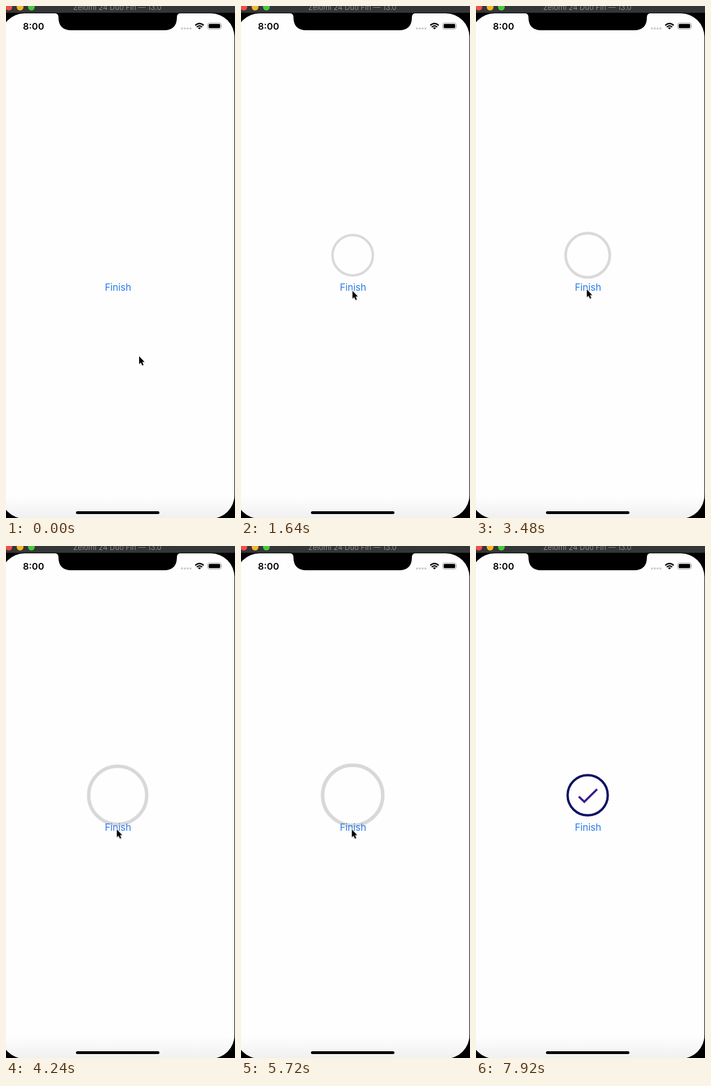
An HTML page that plays this animation: 406x908 px, repeating every 8560 ms.

```html
<!DOCTYPE html>
<html lang="en">
<head>
<meta charset="utf-8">
<title>Finish check</title>
<style>
  :root { --loop: 8560ms linear infinite; }
  html, body { margin: 0; width: 100%; height: 100%; overflow: hidden; background: #000; }
  svg { display: block; width: 406px; height: 908px; }
  text { font-family: Inter, "Open Sans", sans-serif; }

  .ring {
    fill: none; stroke: #d8d8d8; stroke-width: 4.2;
    transform-origin: 198px 442px;
    animation: pulse var(--loop), show var(--loop), tint var(--loop);
    animation-timing-function: ease-in-out, step-end, linear;
  }
  .check {
    fill: none; stroke: #3b1d90; stroke-width: 3.8;
    stroke-dasharray: 1 2;
    animation: draw var(--loop);
  }
  .cursor { animation: move var(--loop); }

  @keyframes pulse {
    0%, 18.4%, 37.68%, 56.95%, 71.26%, 100% { transform: scale(1); }
    8.76%, 28.04%, 47.31%, 66.59% { transform: scale(1.5); }
  }
  @keyframes show {
    0% { visibility: hidden; }
    0.46%, 100% { visibility: visible; }
  }
  @keyframes tint {
    0%, 67% { stroke: #d8d8d8; }
    70%, 100% { stroke: #0f1464; }
  }
  @keyframes draw {
    0%, 67.76% { stroke-dashoffset: 1; animation-timing-function: ease-in-out; }
    74.77%, 100% { stroke-dashoffset: 0; }
  }
  @keyframes move {
    0%, 4.67% { transform: translate(236px, 621px); animation-timing-function: ease-in-out; }
    9.81%, 12.15% { transform: translate(238px, 595px); animation-timing-function: ease-in-out; }
    20.09%, 89.25% { transform: translate(196.5px, 502.5px); animation-timing-function: ease-in; }
    90.65% { transform: translate(185px, 290px); }
    91.59% { transform: translate(138px, 106px); }
    92.5%, 100% { transform: translate(90px, -40px); }
  }
</style>
</head>
<body>
<svg viewBox="0 0 406 908">
  <defs>
    <linearGradient id="foot" x1="0" y1="0" x2="0" y2="1">
      <stop offset="0" stop-color="#fefefe"/>
      <stop offset="1" stop-color="#f0f0f0"/>
    </linearGradient>
    <clipPath id="screen"><rect x="-9" y="13" width="414" height="896" rx="42"/></clipPath>
  </defs>

  <!-- Window bar -->
  <rect width="406" height="908"/>
  <rect width="406" height="12" fill="#343537"/>
  <circle cx="5" cy="2" r="6" fill="#f24e49"/>
  <circle cx="25" cy="2" r="6" fill="#f5b52b"/>
  <circle cx="45" cy="2" r="6" fill="#46c83c"/>
  <text x="197.5" y="7" font-size="13" text-anchor="middle" fill="#8c8c8e">Zelomi 24 Duo Fin — 13.0</text>

  <!-- Screen -->
  <g clip-path="url(#screen)">
    <rect y="13" width="406" height="895" fill="#fefefe"/>
    <rect y="870" width="406" height="38" fill="url(#foot)"/>
  </g>
  <path d="M86 12.5 Q93 13 93 20 Q93 43 116 43 H280 Q303 43 303 20 Q303 13 310 12.5 Z"/>
  <rect x="124" y="896" width="148" height="5" rx="2.5"/>

  <!-- Status bar -->
  <text x="30" y="41.5" font-size="16.5" font-weight="600">8:00</text>
  <g fill="#c9c9c9">
    <circle cx="312" cy="39.8" r="1.9"/><circle cx="317" cy="39.8" r="1.9"/>
    <circle cx="322" cy="39.8" r="1.9"/><circle cx="327" cy="39.8" r="1.9"/>
  </g>
  <g fill="none" stroke="#000" stroke-width="2.3">
    <path d="M335.6 34.4 Q343 27.6 350.4 34.4"/>
    <path d="M338.2 37.3 Q343 32.9 347.8 37.3"/>
  </g>
  <path d="M340.3 39 Q343 36.6 345.7 39 L343 41.6 Z"/>
  <rect x="357.5" y="30" width="24" height="11" rx="3" fill="none" stroke="#a0a0a0"/>
  <rect x="359.3" y="31.8" width="20.4" height="7.4" rx="1.6"/>
  <path d="M382.6 33.6 Q384 35.5 382.6 37.4 Z" fill="#999"/>

  <!-- Progress -->
  <circle class="ring" cx="198" cy="442" r="35.6"/>
  <path class="check" pathLength="1" d="M182.3 444.3 L192 453.6 L214.7 431.4"/>
  <text x="198.5" y="505" font-size="17" text-anchor="middle" letter-spacing="-0.1" fill="#2b7bea">Finish</text>

  <g class="cursor">
    <path d="M0 0 V14 L3.1 11.2 L5.4 16.6 L7.9 15.5 L5.6 10.2 H9.6 Z" transform="translate(.6 2)" fill="#000" opacity=".15"/>
    <path d="M0 0 V14 L3.1 11.2 L5.4 16.6 L7.9 15.5 L5.6 10.2 H9.6 Z" stroke="#fff" stroke-width="1.6" paint-order="stroke"/>
  </g>
</svg>
</body>
</html>
```
